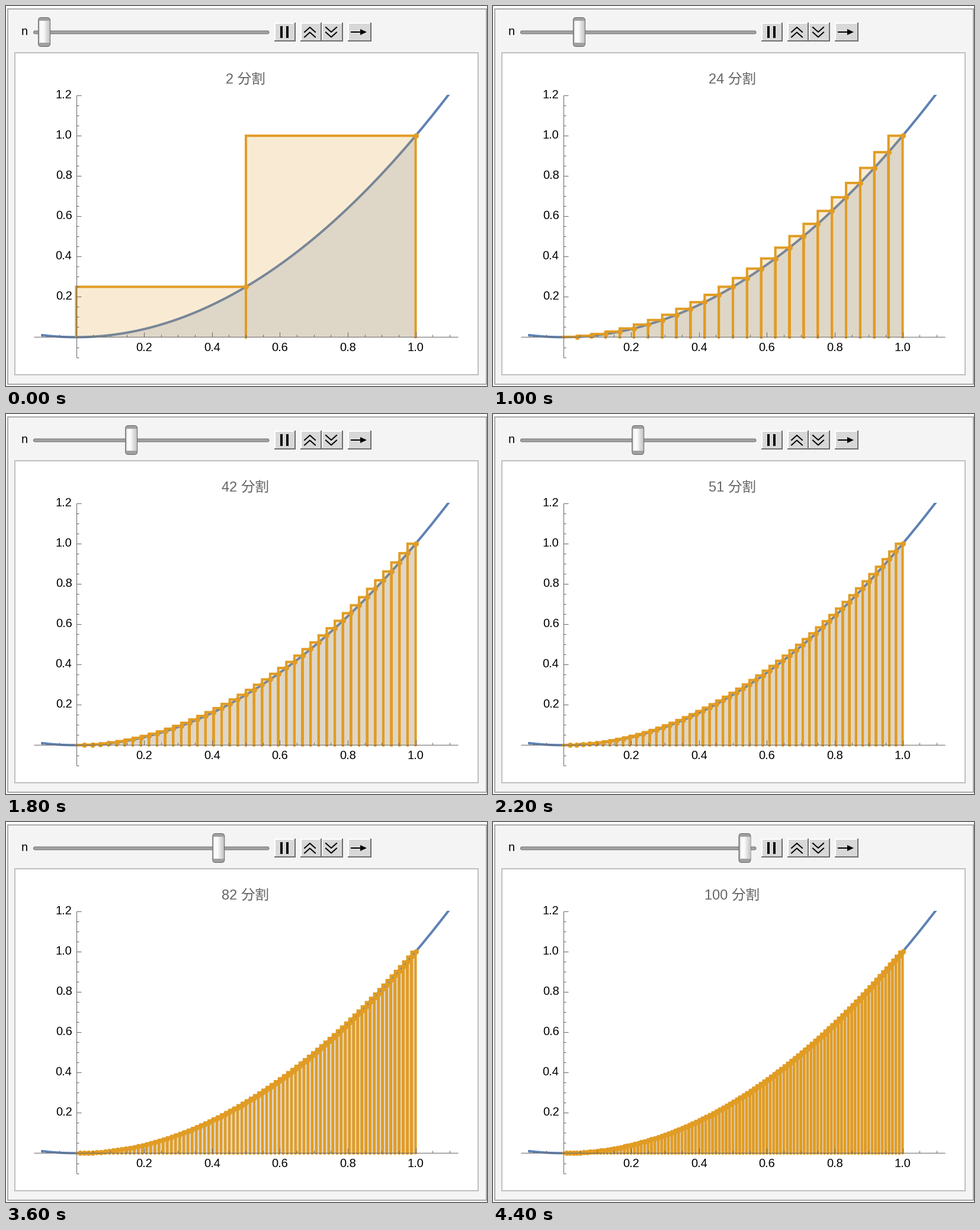
A matplotlib script for the animation above (4.5 s loop, 812 by 642 pixels).

```python
import numpy as np
import matplotlib.pyplot as plt
from matplotlib.animation import FuncAnimation
from matplotlib.patches import FancyBboxPatch, PathPatch, Polygon, Rectangle
from matplotlib.path import Path

W, H, DPI = 812, 642, 100
FRAMES, N_MIN, N_MAX = 45, 2, 100
PT = 72 / DPI
GOLD, BLUE, GREY = "#e19c24", "#5e81b5", "#666666"

plt.rcParams["font.family"] = ["Liberation Sans", "Noto Sans CJK JP"]
# the small margin keeps the pixel size from rounding down
fig = plt.figure(figsize=((W + 0.01) / DPI, (H + 0.01) / DPI), dpi=DPI,
                 facecolor="white")
ax = fig.add_axes([0, 0, 1, 1])
ax.set(xlim=(0, W), ylim=(H, 0))
ax.axis("off")
ax.set_autoscale_on(False)


def px(x):
    return 118.5 + 573 * np.asarray(x, float)


def py(y):
    return 559.5 - 340.3 * np.asarray(y, float)


def box(x0, y0, x1, y1, color, z=1):
    ax.add_patch(Rectangle((x0, y0), x1 - x0, y1 - y0, fc=color, lw=0, zorder=z))


def frame(x0, y0, x1, y1, edge, face):
    box(x0, y0, x1, y1, edge)
    box(x0 + 2, y0 + 2, x1 - 2, y1 - 2, face)


def line(xs, ys, color="black", width=1.0, z=2, **kw):
    return ax.plot(xs, ys, color=color, lw=width * PT, zorder=z, **kw)[0]


def label(x, y, s, size=20, color="black", ha="center"):
    return ax.text(x, y, s, fontsize=size * PT, color=color, ha=ha,
                   va="baseline", zorder=9)


def rounded(x0, y0, x1, y1, r, face, edge, z):
    patch = FancyBboxPatch((x0, y0), x1 - x0, y1 - y0,
                           boxstyle=f"round,pad=0,rounding_size={r}",
                           fc=face, ec=edge, lw=PT, zorder=z)
    return ax.add_patch(patch)


def button(x0, x1):
    box(x0, 28, x1, 60, "#6e6e6e")
    box(x0, 28, x1 - 2, 58, "#ffffff")
    box(x0 + 2, 30, x1 - 2, 58, "#d8d8d8")


def chevrons(cx, tip):
    for y in (40, 48.5):
        line([cx - 9, cx, cx + 9], [y - tip, y + tip, y - tip], width=2, z=3)


def draw_panel():
    frame(2, 4, 812, 640, "#a9a9a9", "#f4f4f4")
    frame(14, 78, 798, 624, "#c0c0c0", "white")
    label(26, 48.5, "n", ha="left")
    rounded(46.5, 42, 444, 47, 2.5, "#a2a2a2", "#707070", 3)
    for x0, x1 in ((453, 489), (497, 533), (533, 569), (577, 617)):
        button(x0, x1)
    box(463, 34, 467, 54, "black", 3)
    box(473, 34, 477, 54, "black", 3)
    chevrons(513, -4)
    chevrons(549, 4)
    line([583, 601], [44, 44], width=2, z=3)
    ax.add_patch(Polygon([(598, 39), (609, 44), (598, 49)], fc="black", lw=0, zorder=3))


def draw_axes():
    style = dict(color=GREY, z=8, solid_capstyle="butt")
    line([47, 763], [559.5, 559.5], **style)
    line([118.5, 118.5], [151, 594], **style)
    for k in range(-2, 25):
        v, major = k / 20, k % 4 == 0
        size = 8 if major else 4.5
        if k == 0:
            continue
        line([118.5, 118.5 + size], [py(v)] * 2, **style)
        if major:
            label(111.5, py(v) + 5, f"{v:.1f}", ha="right")
        if k <= 22:
            line([px(v)] * 2, [559.5, 559.5 - size], **style)
            if major and k <= 20:
                label(px(v), 583, f"{v:.1f}")


def draw_curve():
    x = np.linspace(0, 1, 200)
    ax.fill_between(px(x), py(x * x), py(0), color=BLUE, alpha=0.2, lw=0, zorder=3)
    x = np.linspace(-0.1, 1.1, 300)
    curve = line(px(x), py(x * x), BLUE, 4, z=4)
    curve.set_clip_path(Rectangle((40, 150.5), 740, 460, transform=ax.transData))


draw_panel()
draw_curve()
draw_axes()

fill = ax.add_patch(Polygon([(0, 0), (1, 0), (1, 1)], fc=GOLD, alpha=0.2, lw=0, zorder=5))
bars = ax.add_patch(PathPatch(Path([(0, 0), (1, 1)]), fill=False, ec=GOLD, lw=4 * PT,
                              joinstyle="miter", capstyle="projecting",
                              snap=False, zorder=6))
dots = ax.plot([], [], "o", color=GOLD, ms=9 * PT, mew=0, zorder=7)[0]
title = label(404, 131, "", 23.6, GREY)

thumb = rounded(54.5, 19.5, 74.5, 68.5, 5, "#a0a0a0", "#686868", 4)
shade = np.interp(np.linspace(0, 1, 34), [0, 0.1, 0.4, 1], [0.85, 0.98, 0.98, 0.76])
body = ax.imshow(shade[None, :], cmap="gray", vmin=0, vmax=1, aspect="auto",
                 extent=(56, 73, 62, 26), zorder=5)
ax.set(xlim=(0, W), ylim=(H, 0))


def update(i):
    n = round(N_MIN + (N_MAX - N_MIN) * i / (FRAMES - 1))
    x = np.arange(n + 1) / n
    left, right, top = px(x[:-1]), px(x[1:]), py(x[1:] ** 2)
    base = np.full(n, float(py(0)))

    xs = np.stack([left, left, right, right], axis=1)
    ys = np.stack([base, top, top, base], axis=1)
    codes = [Path.MOVETO] + [Path.LINETO] * 3
    bars.set_path(Path(np.column_stack([xs.ravel(), ys.ravel()]), codes * n))

    stairs = np.column_stack([xs[:, 1:3].ravel(), ys[:, 1:3].ravel()])
    fill.set_xy(np.vstack([(px(0), py(0)), stairs, (px(1), py(0))]))

    dots.set_data(right, top)
    title.set_text(f"{n} 分割")
    cx = 64.5 + 360.5 * (n - N_MIN) / (N_MAX - N_MIN)
    thumb.set_x(cx - 10)
    body.set_extent((cx - 8.5, cx + 8.5, 62, 26))
    return fill, bars, dots, title, thumb, body


anim = FuncAnimation(fig, update, frames=FRAMES, interval=100, repeat=True,
                     repeat_delay=0, blit=False)
plt.show()
```
